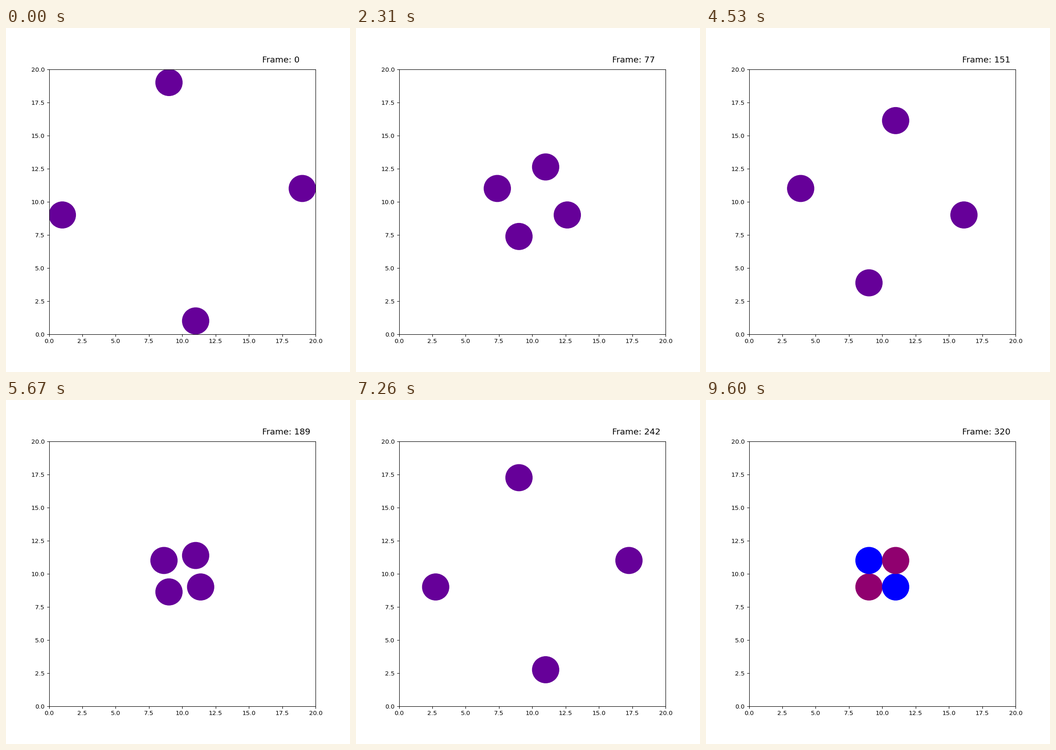
Animation of 748 by 748 pixels, one loop 9630 ms. Source, as a matplotlib script:

```python
import matplotlib.pyplot as plt
from matplotlib.animation import FuncAnimation
from matplotlib.patches import Circle

FRAMES, INTERVAL = 321, 30
SIDE = 20 / 2.54    # 20 cm in inches, 748 px at 95 dpi
LEG = 64            # frames from wall to centre
STEP = 0.125        # distance per frame
SPEED = 0.4         # sets the colour: slow is blue, fast is red

# Each disc belongs to one corner of the centre square and leaves it
# either along x or along y.
CORNERS = [(-1, -1), (-1, 1), (1, -1), (1, 1)]

plt.rcParams["font.family"] = "DejaVu Sans"
fig, ax = plt.subplots(figsize=(SIDE, SIDE), dpi=95)
ax.set(xlim=(0, 20), ylim=(0, 20))
label = ax.text(16, 20.5, "", fontsize=14)
discs = [ax.add_patch(Circle((10, 10), 1)) for _ in CORNERS]


def speed_color(speed):
    return (speed, 0, 1 - speed)


def moves_along_x(corner, swapped):
    sx, sy = corner
    return (sx == sy) != swapped


def place(frame):
    """Centre and speed of every disc."""
    phase = frame % (4 * LEG)
    gap = STEP * abs(LEG - phase % (2 * LEG))
    swapped = LEG < phase <= 3 * LEG
    for corner in CORNERS:
        sx, sy = corner
        along_x = moves_along_x(corner, swapped)
        x = 10 + sx * (1 + gap * along_x)
        y = 10 + sy * (1 + gap * (not along_x))
        speed = SPEED
        if gap == 0:
            # vertical contacts resolve first: one disc takes all the motion
            speed = SPEED * 2 ** 0.5 if along_x else 0
        yield (x, y), speed


def draw(frame):
    for disc, (center, speed) in zip(discs, place(frame)):
        disc.center = center
        disc.set_color(speed_color(speed))
    label.set_text(f"Frame: {frame}")
    return [*discs, label]


def init():
    return draw(0)


anim = FuncAnimation(fig, draw, frames=FRAMES, init_func=init,
                     interval=INTERVAL, repeat=True, repeat_delay=0)
plt.show()
```
